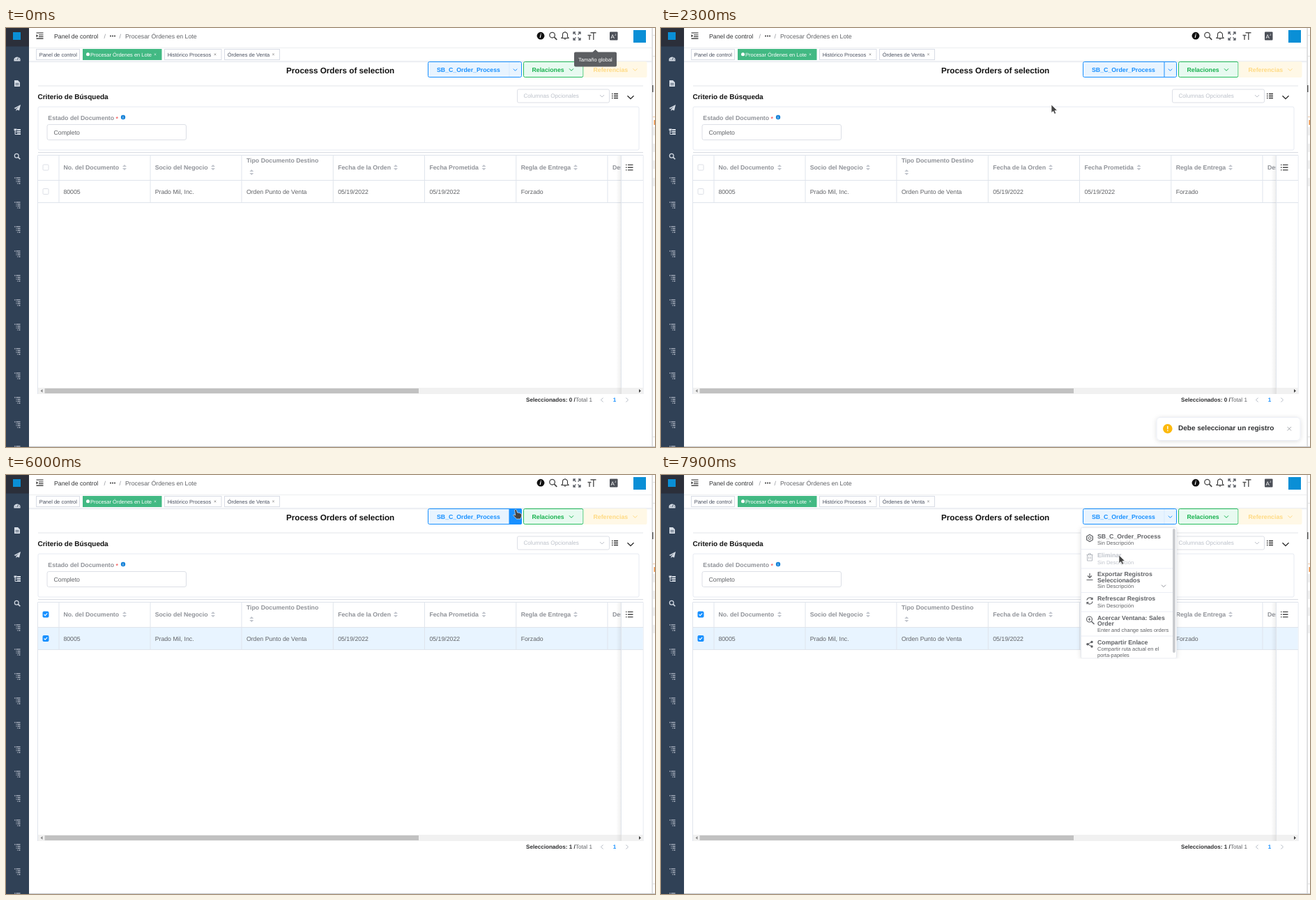
These frames come from a looping animation (931 by 601 pixels, 8000 ms). An HTML page:

```html
<!DOCTYPE html>
<html lang="es">
<head>
<meta charset="utf-8">
<title>Procesar Órdenes en Lote</title>
<style>
html, body { margin: 0; width: 100%; height: 100%; overflow: hidden; background: #fff; }
svg { display: block; }
text { font-family: "Liberation Sans", Arial, sans-serif; text-rendering: geometricPrecision; white-space: pre; }
</style>
</head>
<body>
<svg id="stage" width="931" height="601" viewBox="0 0 931 601"></svg>
<script>
const BLUE = '#1890ff', LINE = '#dfe4ec', GREY = '#606266', HEAD = '#909399';

// Markup helpers; text is placed by the middle of its capitals.
const rect = (x, y, w, h, fill, more = '') =>
  `<rect x="${x}" y="${y}" width="${w}" height="${h}" fill="${fill}" ${more}/>`;
const box = (x, y, w, h, fill, stroke, r = 2, more = '') =>
  rect(x + .5, y + .5, w - 1, h - 1, fill, `stroke="${stroke}" rx="${r}" ${more}`);
const text = (x, y, str, size = 8.75, fill = GREY, bold = false, more = '') =>
  `<text x="${x}" y="${y + size * .36}" font-size="${size}" fill="${fill}" ${bold ? 'font-weight="700"' : ''} ${more}>${str}</text>`;
const line = (d, stroke = LINE, width = 1, more = '') =>
  `<path d="${d}" fill="none" stroke="${stroke}" stroke-width="${width}" ${more}/>`;
const shape = (d, fill, more = '') => `<path d="${d}" fill="${fill}" ${more}/>`;
const dot = (x, y, r, fill, more = '') => `<circle cx="${x}" cy="${y}" r="${r}" fill="${fill}" ${more}/>`;
const group = (id, body, more = '') => `<g id="${id}" ${more}>${body}</g>`;
const chevron = (x, y, w, color, width = 1) => line(`M${x - w} ${y - w / 2}l${w} ${w}l${w} ${-w}`, color, width);
const cross = (x, y, s, color) => line(`M${x - s} ${y - s}l${2 * s} ${2 * s}m0 ${-2 * s}l${-2 * s} ${2 * s}`, color, .8);
const lens = (x, y, r, color, width) =>
  dot(x, y, r, 'none', `stroke="${color}" stroke-width="${width}"`) +
  line(`M${x + r * .75} ${y + r * .75}l${r} ${r}`, color, width * 1.3);
const listIcon = (x, y, w, color, gap = 3) => [-gap, 0, gap].map(d =>
  line(`M${x} ${y + d}h1.5m1.5 0h${w - 3}`, color, 1.3)).join('');
const sorter = (x, y) => shape(`M${x - 3} ${y - 1}l3 -3l3 3zM${x - 3} ${y + 1}l3 3l3 -3z`, '#c0c4cc');

function sidebar() {
  const c = '#d5dce5';
  let s = rect(0, 0, 33, 601, '#304156') + rect(0, 0, 33, 26.5, '#2b2f3a') + rect(10, 6, 11, 11, '#0a8fd6');
  s += shape('M11.5 47.5a4.7 4.7 0 1 1 9 0z', c) + line('M16 46l1.5-3.5M13.5 45h1M18.5 45h1', '#304156', .9);
  s += shape('M12 75h5l3 3v6h-8z', c) + line('M13.5 79.5h5M13.5 81.5h5', '#304156', .8);
  s += shape('M11.5 115l9.5-5l-2 8.5l-3-1.2l-1.5 2v-2.8l4-4l-5 3.6z', c);
  s += line('M13 145v7.5h3M13 149h3', c) + rect(11.5, 144.5, 4, 2.5, c) +
    [145, 148, 151].map(y => rect(16, y, 5, 2, c)).join('');
  s += lens(15.2, 183.2, 2.9, c, 1.2);
  for (let y = 219; y < 640; y += 35)
    s += line(`M12 ${y - 4}h1.5m1 0h6M14.5 ${y - 1.3}h1m1 0h4M14.5 ${y + 1.3}h1m1 0h4M16 ${y + 4}h1m1 0h2.5`, c, 1.1);
  return s;
}

function navbar() {
  const c = '#5a5e66';
  let s = line('M43.5 7h10M47 10h6.5M47 12.5h6.5M43.5 15.2h10', '#222', 1.2) + shape('M43.5 9.2l2.6 2l-2.6 2z', '#222');
  s += text(69, 11.5, 'Panel de control', 8.75, '#303133') + text(140.5, 11.5, '/', 8.75, HEAD) +
    [150, 153, 156].map(x => dot(x, 11.5, 1, '#303133')).join('') +
    text(162.5, 11.5, '/', 8.75, HEAD) + text(171, 11.5, 'Procesar Órdenes en Lote');
  s += dot(767, 11.2, 5.4, '#111') + text(765.6, 11.2, 'i', 8.5, '#fff', true, 'font-style="italic"');
  s += lens(783.6, 10.2, 3.8, '#444', 1.3);
  s += line('M797 14.5h10l-1.5-2v-3a3.5 3.5 0 0 0-7 0v3zM800.5 16h3M802 5v1', '#333', 1.1);
  s += line('M814 9v-3h3m4 0h3v3m0 5v3h-3m-4 0h-3v-3M814.5 6.5l3 3m3 0l3-3m0 10l-3-3m-3 0l-3 3', c, 1.3);
  s += line('M838.5 6.7h8M842.8 6v11M834.5 10.5h5M837 10v7', '#555', 1.4);
  s += rect(866, 5.5, 11.5, 12, '#4b4f57', 'rx="1"') + text(867.5, 12, 'A', 8, '#fff') + text(873.2, 9, 'z', 4.5, '#fff');
  s += rect(900, 3, 18, 18, '#0a8fd6');
  s += rect(33, 28, 893, 1, '#eceef0') + rect(33, 47.5, 893, 1, '#d8dce5') + rect(33, 48.5, 893, 1, '#f4f5f7');
  [[43, 63, 'Panel de control'], [110, 113.5, 'Procesar Órdenes en Lote'],
   [227, 82.5, 'Histórico Procesos'], [313, 80, 'Órdenes de Venta']].forEach(([x, w, name], i) => {
    const on = i == 1, ink = on ? '#fff' : '#495060';
    s += box(x, 30, w, 16, on ? '#42b983' : '#fff', on ? '#42b983' : '#d8dce5', 0);
    if (on) s += dot(117.5, 37.7, 2.5, '#fff');
    s += text(x + (on ? 11 : 4.7), 38.2, name, 7.5, ink);
    if (i) s += cross(x + w - 9.5, 37.8, 1.3, on ? '#cfeee0' : '#888');
  });
  return s;
}

function buttons() {
  return text(402, 60.5, 'Process Orders of selection', 11.7, '#111', true) +
    box(605, 48, 135, 23, '#e8f4ff', BLUE) +
    rect(721.5, 49, 1, 21, '#d5eaff', 'id="divider"') +
    rect(605, 48, 117, 23, BLUE, 'id="mainHover" rx="2"') +
    text(618, 59.5, 'SB_C_Order_Process', 8.75, BLUE, true, 'id="mainLabel"') +
    rect(722, 48, 18, 23, BLUE, 'id="dropHover" rx="2"') +
    chevron(730.5, 60, 2.7, BLUE) +
    box(742, 48, 86.5, 23, '#e7faf0', '#26bd5c') + text(754.5, 59.5, 'Relaciones', 8.75, '#17b24e', true) +
    chevron(811, 59.8, 3, '#17b24e') +
    rect(828.5, 48, 91, 23, '#fff8e6', 'rx="2"') + text(842.5, 59.5, 'Referencias', 8.75, '#ffda83', true) +
    chevron(902.5, 59.8, 3, '#ffda83');
}

function criteria() {
  return rect(46, 82.5, 868, 1, '#e3e5e9') +
    text(45.5, 98.8, 'Criterio de Búsqueda', 10, '#111', true) +
    box(733, 87.5, 133, 20, '#fff', '#dcdfe6') + text(742.5, 97.5, 'Columnas Opcionales', 8.125, '#bcc1ca') +
    chevron(855, 97.5, 3, '#c0c4cc') + listIcon(869, 97.5, 9, '#333') + chevron(896, 99.5, 4.5, '#222', 1.2) +
    box(45.5, 112.5, 863, 63, '#fff', '#e6eaf2') +
    text(60.3, 129.3, 'Estado del Documento', 8.75, HEAD, true) + text(157.5, 130, '*', 8.75, '#f56c6c', true) +
    dot(168, 128, 3.2, '#1682d8') + text(167.2, 128, 'i', 5, '#fff', true) +
    box(58.5, 138, 200.5, 23, '#fff', '#dcdfe6', 2.5) + text(68.5, 149.7, 'Completo');
}

const checkbox = (id, y) => box(52.5, y - 4.5, 9, 9, '#fff', '#dcdfe6', 1.2, `id="${id}"`) +
  line(`M54.6 ${y}l1.6 1.7l3 -3.3`, '#fff', 1.1);

function table() {
  let s = rect(46, 178, 868, 1, '#d9dce2') + rect(46, 218.5, 868, 32, '#fff', 'id="row"');
  s += line('M45.5 525V182.5H914V525M46 218.5H914M46 250.5H914');
  for (const x of [76, 207, 338, 469.3, 600.5, 731.8, 863]) s += line(`M${x} 182.5V250.5`);
  s += checkbox('checkAll', 200) + checkbox('checkRow', 234.5);
  const heads = ['No. del Documento', 'Socio del Negocio', '', 'Fecha de la Orden', 'Fecha Prometida', 'Regla de Entrega', 'Des'];
  const cells = ['80005', 'Prado Mil, Inc.', 'Orden Punto de Venta', '05/19/2022', '05/19/2022', 'Forzado'];
  const carets = [170, 297, 0, 559, 685.5, 817];
  heads.forEach((name, i) => {
    const x = 82.4 + i * 131.25;
    s += text(x, 200.2, name, 8.75, HEAD, true) + text(x, 234.5, cells[i] || '');
    if (carets[i]) s += sorter(carets[i], 200);
  });
  s += text(344.9, 189.7, 'Tipo Documento Destino', 8.75, HEAD, true) + sorter(352.3, 207);
  // Fixed column on the right
  s += rect(875, 183, 8, 333, 'url(#edge)') + rect(882.5, 183, 31, 333, '#fff') +
    rect(882.5, 219, 31, 31.5, '#fff', 'id="rowFixed"') + line('M882.5 218.5H914M882.5 250.5H914M882.5 183V516') +
    listIcon(889, 200, 10.5, '#444', 3.7);
  s += rect(46, 516, 868, 9, '#f1f1f1') + rect(55.5, 517, 536.5, 7, '#c1c1c1') +
    shape('M52.5 518v5l-3-2.5z', '#888') + shape('M908 518v5l3-2.5z', '#444') +
    rect(875, 516, 8, 9, 'url(#edge)');
  s += text(746, 533.5, 'Seleccionados: <tspan id="count">0</tspan> /', 8.125, '#303133', true) + text(817, 533.5, 'Total 1', 8.125) +
    line('M856.5 530.5l-3 3l3 3', '#b4bac4') + text(870.7, 533.5, '1', 8.125, BLUE, true) + line('M889.5 530.5l3 3l-3 3', '#b4bac4');
  return s;
}

const notice = () =>
  rect(711, 558.5, 206, 33, '#fff', 'rx="5" stroke="#ebeef5" filter="url(#shadow)"') +
  dot(726.8, 574.7, 6.8, '#fcb90d') + line('M726.8 571v4.5m0 1.3v1.4', '#fff', 1.4) +
  text(742, 573, 'Debe seleccionar un registro', 10, '#303133', true) + cross(901.3, 574.8, 2.7, HEAD);

function menu() {
  let s = rect(602.5, 75.5, 137, 187.5, '#fff', 'rx="2" stroke="#e6e9ef" filter="url(#shadow)"');
  for (const y of [106, 133.5, 168, 195.5, 230.5]) s += rect(603, y, 131, 1, '#ebeef5');
  const item = (y, name, y2, sub, ink = GREY) =>
    name.split('|').map((part, i) => text(626, y + i * 8.8, part, 8.75, ink, true)).join('') +
    sub.split('|').map((part, i) => text(626, y2 + i * 8.8, part, 7.5, ink)).join('');
  s += item(88, 'SB_C_Order_Process', 97.5, 'Sin Descripción') +
    item(115.3, 'Eliminar', 125, 'Sin Descripción', '#c0c4cc') +
    item(142.3, 'Exportar Registros|Seleccionados', 159.5, 'Sin Descripción') +
    item(177.3, 'Refrescar Registros', 187, 'Sin Descripción') +
    item(204.5, 'Acercar Ventana: Sales|Order', 222, 'Enter and change sales orders') +
    item(239.7, 'Compartir Enlace', 249.3, 'Compartir ruta actual en el|porta-papeles');
  s += line('M615 85.5l4.3 2.5v5l-4.3 2.5l-4.3-2.5v-5z', GREY, 1.3) + dot(615, 90.5, 1.9, 'none', `stroke="${GREY}"`);
  s += line('M610.5 114.5h9m-8 0v8.5h7v-8.5m-5 0v-1.8h3v1.8m-2.8 2.5v3.5m2.5 -3.5v3.5', '#b4b8bf');
  s += line('M615 141v6.5m-3-3l3 3l3-3M610.5 150.5h9', GREY, 1.2);
  s += line('M611 179.5a4.2 4.2 0 0 1 7.8-1.5m.2-2.2v2.6h-2.6M619 181.5a4.2 4.2 0 0 1-7.8 1.5m-.2 2.2v-2.6h2.6', GREY, 1.2);
  s += lens(614.5, 207, 4, GREY, 1.1) + line('M612.5 207h4m-2-2v4', GREY);
  s += line('M618 239.5l-6 3.2l6 3.2', GREY) + dot(618, 239.5, 1.7, GREY) + dot(612, 242.7, 1.8, GREY) + dot(618, 246, 1.7, GREY);
  return s + chevron(721, 159.2, 3, HEAD) + rect(734, 77, 3.8, 178, '#c9cbcf', 'rx="1.9"');
}

// Neighbouring window, seen as a strip at the right edge
const backdrop = () => rect(926, 0, 5, 601, '#fff') + rect(926.5, 0, 1.2, 601, '#c9cbce') +
  [10, 40, 586].map(y => rect(928, y, 3, 1, '#e3e3e3')).join('') + rect(927, 82, 1.5, 10, '#555') +
  rect(928, 127, 3, 1, '#f3c9a6') + rect(929.5, 132, 1.5, 7, '#ee9448') +
  [142, 166, 190, 215].map(y => rect(928, y, 3, 12, '#f1f1f1')).join('') + rect(33, 600, 898, 1, '#c4c7cb');

const ARROW = 'M0 0V11.5L2.7 9.3L4.5 13.3L6.6 12.3L4.8 8.6L8.3 8.2Z';
const HAND = 'M3.5.6Q4.8 0 5.4 1.4L6.6 5Q9.6 4.8 12 6.6Q13 7.6 12.6 10L11 14H5.6L.8 9.3Q.2 8 1.7 7.9L3.7 8.8L2.6 2Q2.6 1 3.5.6Z';

stage.innerHTML = `<defs>
  <filter id="shadow" x="-20%" y="-30%" width="140%" height="160%"><feDropShadow dx="0" dy="1.2" stdDeviation="3.2" flood-opacity=".13"/></filter>
  <linearGradient id="edge"><stop stop-color="#000" stop-opacity="0"/><stop offset="1" stop-color="#000" stop-opacity=".07"/></linearGradient>
  <clipPath id="page"><path d="M0 0H926V601H0z"/></clipPath>
  <clipPath id="menuClip"><path d="M590 70H752V263.5H590z"/></clipPath></defs>` +
  rect(0, 0, 931, 601, '#fff') + navbar() + buttons() + criteria() + table() + sidebar() + backdrop() +
  `<g clip-path="url(#page)">${group('notice', notice())}</g>` +
  group('menu', menu(), 'clip-path="url(#menuClip)"') +
  group('tip', shape('M815 36.5q0-2 2-2h24.5l4-3.5l4 3.5h24.5q2 0 2 2v17q0 2-2 2h-57q-2 0-2-2z', '#5c5e62') +
    text(821, 45, 'Tamaño global', 7.5, '#fff')) +
  shape(ARROW, '#444', 'id="pointer" stroke="#fff" stroke-width=".6"');

// Pointer stops: time, x, y, and 1 for the hand
const stops = [
  [300, 820, 214], [400, 790, 180], [500, 760, 150], [600, 735, 118], [700, 715, 90], [800, 706, 74], [900, 700, 63, 1], [1000, 698, 60, 1],
  [2200, 690, 74], [2300, 560, 110], [2400, 330, 180], [2500, 120, 238], [2600, 56, 248], [3000, 53, 238, 1], [3200, 52, 230, 1],
  [3300, 58.5, 218], [3500, 57, 224], [3700, 58, 219], [3900, 55, 229, 1], [4100, 52, 229, 1], [4200, 54, 229, 1],
  [4700, 328, 163], [4900, 409, 152], [5100, 560, 125], [5200, 705, 97], [5400, 715, 72], [5500, 727, 49, 1],
  [6600, 690, 102, 1], [6800, 663, 141, 1], [7000, 656, 198, 1], [7100, 655, 212, 1], [7200, 653, 227, 1],
  [7400, 652, 232, 1], [7600, 653, 236, 1], [7800, 654, 170, 1], [7900, 657, 115]
];

const $ = id => document.getElementById(id);
const set = (id, attrs) => { for (const k in attrs) $(id).setAttribute(k, attrs[k]); };
const show = (id, amount) => set(id, { opacity: +amount });

function draw(now) {
  const t = Math.floor(now % 8000 / 100) * 100;
  const within = (a, b) => t >= a && t < b;
  const picked = t >= 4400, hover = within(2400, 3500) || within(3700, 4400);
  const mainOn = within(900, 2200);

  show('tip', t < 300 ? 1 : t < 400 ? .4 : 0);
  show('mainHover', mainOn);
  set('mainLabel', { fill: mainOn ? '#fff' : BLUE });
  set('divider', { fill: within(900, 3500) || within(5500, 6600) ? BLUE : '#d5eaff' });
  show('dropHover', within(5500, 6600));

  const rowFill = picked ? '#e8f4ff' : hover ? '#f5f7fa' : '#fff';
  set('row', { fill: rowFill });
  set('rowFixed', { fill: rowFill });
  const mark = on => ({ fill: picked ? BLUE : '#fff', stroke: picked || on ? BLUE : '#dcdfe6' });
  set('checkAll', mark(false));
  set('checkRow', mark(hover && t >= 2600));
  $('count').textContent = +picked;

  const slide = t < 1700 ? 93 * .3 ** ((t - 1400) / 100) : 0;
  set('notice', { transform: `translate(${slide})`, opacity: within(1400, 5700) ? 1 : t == 5700 ? .5 : within(5800, 6000) ? .05 : 0 });

  const grow = t < 6300 ? .75 : 1;
  set('menu', { transform: `translate(0 ${75.5 * (1 - grow)}) scale(1 ${grow})`, opacity: t < 6100 ? 0 : grow });

  const stop = stops.findLast(s => s[0] <= t);
  show('pointer', !!stop);
  if (stop) set('pointer', { d: stop[3] ? HAND : ARROW, transform: `translate(${stop[1]} ${stop[2]})` });
}

const start = performance.now();
(function frame() {
  draw(performance.now() - start);
  requestAnimationFrame(frame);
})();
</script>
</body>
</html>
```
